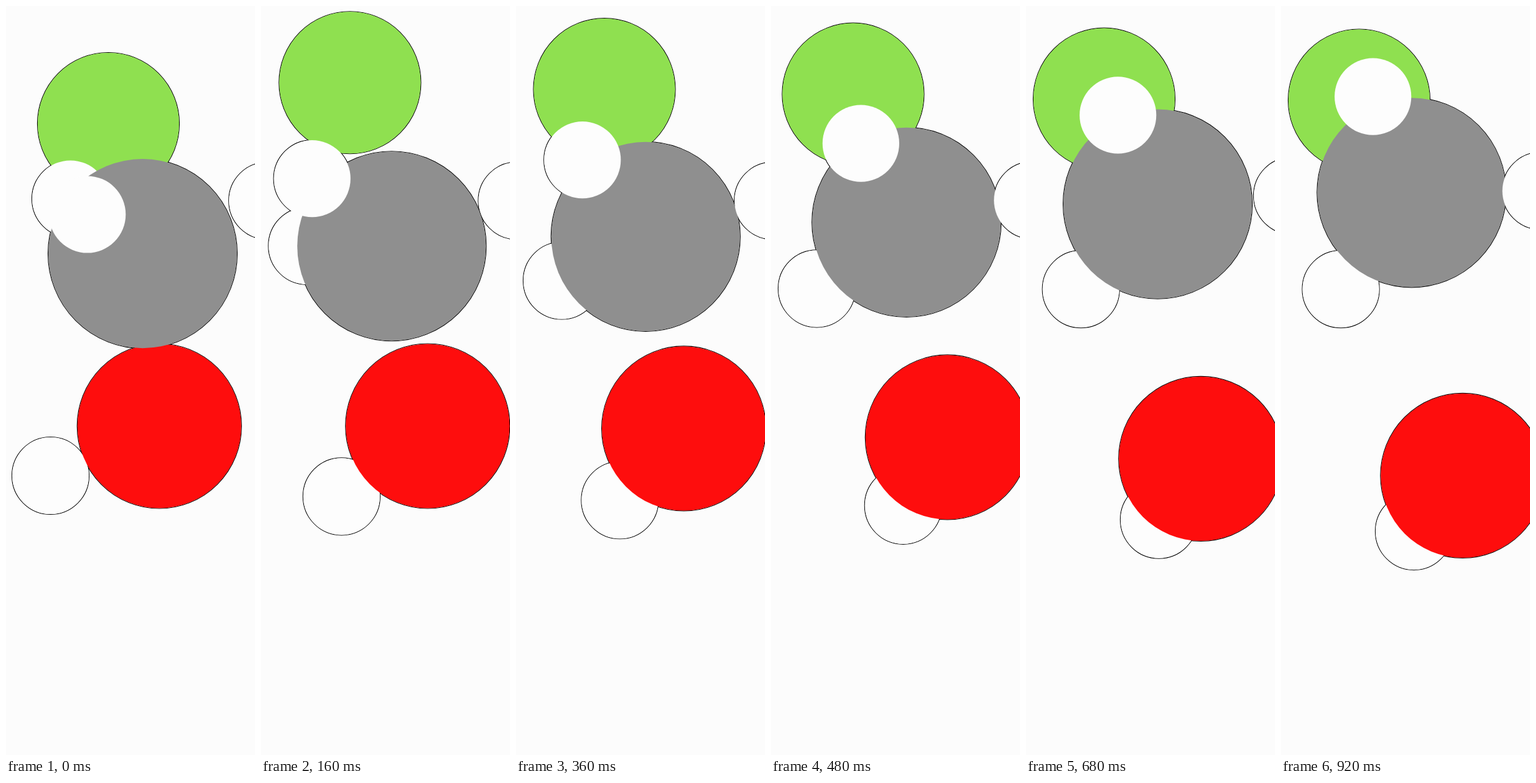
An HTML page with a canvas that plays this animation: 400x1200 px, repeating every 0.96 s.

```html
<!DOCTYPE html>
<html lang="en">
<head>
<meta charset="utf-8">
<title>Drifting circles</title>
<style>
  html, body { margin: 0; width: 100%; height: 100%; overflow: hidden; background: #fcfcfc; }
  canvas { display: block; }
</style>
</head>
<body>
<canvas id="stage" width="400" height="1200"></canvas>
<script>
const ctx = document.getElementById('stage').getContext('2d');
const STEP = 40, LOOP = 960;
const BACK = '#fcfcfc', WHITE = '#fdfdfd';
const SMALL = 62.5, WALL = 11;

// All times below are counted in steps
const part = (t, start, end) => Math.min(1, Math.max(0, (t - start) / (end - start)));

// Travel by a distance: glide slows to a stop, shift also starts gently
const glide = (t, by, start, end) => by * (1 - (1 - part(t, start, end)) ** 2);
const shift = (t, by, start, end) => by * (1 - Math.cos(Math.PI * part(t, start, end))) / 2;
const swing = (t, size, period, peak) => size * Math.cos(2 * Math.PI * (t - peak) / period);

// The red circle and the small one behind it shake together
const shake = t => swing(t, 1, 9, 4);

// Listed from back to front
const circles = [
  { r: 114.5, fill: '#8fe050',
    x: t => 164.5 + glide(t, -22.5, 0, 5) + glide(t, -16.5, 9, 17),
    y: t => 188.5 + glide(t, -68.5, 0, 5) + glide(t, 31, 5, 21) },
  { r: SMALL, fill: WHITE,
    x: t => Math.max(WALL + SMALL, 70 + swing(t, 35, 21.5, 20.5)),
    y: t => 309 + glide(t, 144.7, 0, 13) },
  { r: SMALL, fill: WHITE,
    x: t => Math.min(213.5, 79 + 10.6 * t + 8 * shake(t)),
    y: t => 752.5 + glide(t, 37.5, 0, 6) + shift(t, 52, 7, 24) },
  { r: 132.5, fill: '#fe0d0d',
    x: t => 251 + glide(t, 37, 0, 23) + 5 * shake(t),
    y: t => 673 + shift(t, 80, 6.5, 24) },
  { r: 152.5, fill: '#8f8f8f',
    x: t => 212 + swing(t, 7.5, 13.5, 0),
    y: t => 395 + shift(t, -96, 0, 24) + swing(t, 4, 11, 9) },
  { r: SMALL, fill: WHITE,
    x: t => 418.5 + swing(t, 9, 22, 17),
    y: t => 312 + shift(t, -16, 10, 24) },
  { r: SMALL, fill: WHITE,
    x: t => 130.7 + shift(t, -50, 0, 4.5) + shift(t, 67, 6, 13),
    y: t => 334 + glide(t, -57, 0, 5) + shift(t, -132.5, 2, 24) }
];

function disc(c, t, r) {
  ctx.beginPath();
  ctx.arc(c.x(t), c.y(t), r, 0, 2 * Math.PI);
}

function draw(now) {
  const t = Math.floor((now % LOOP) / STEP);

  ctx.fillStyle = BACK;
  ctx.fillRect(0, 0, 400, 1200);

  // Outlines lie under every fill, so they show only on the backdrop
  ctx.lineWidth = 1.2;
  ctx.strokeStyle = '#000';
  for (const c of circles) {
    disc(c, t, c.r - 0.5);
    ctx.stroke();
  }
  for (const c of circles) {
    disc(c, t, c.r - 0.9);
    ctx.fillStyle = c.fill;
    ctx.fill();
  }
}

function tick() {
  draw(performance.now());
  requestAnimationFrame(tick);
}
tick();
</script>
</body>
</html>
```
